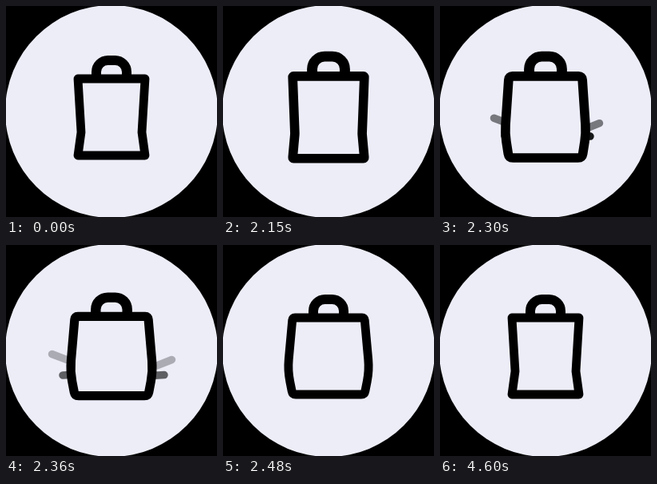
Recreate the animation shown at these times as an HTML page. Size 264 by 264 pixels, loop 4.63 s.

```html
<!DOCTYPE html>
<html lang="en">
<head>
<meta charset="utf-8">
<title>Bag</title>
<style>
  html, body { margin: 0; width: 100%; height: 100%; overflow: hidden; background: #000; }
  svg { display: block; width: 100vw; height: 100vh; }
</style>
</head>
<body>
<svg viewBox="0 0 264 264" fill="none" stroke="#000" stroke-linecap="round" stroke-linejoin="round">
  <circle cx="132" cy="132" r="133" fill="#ecedf7" stroke="none"/>
  <g id="rays" stroke-width="9.5"></g>
  <g id="bag">
    <path d="M113 90V82.5a14.5 14.5 0 0 1 14.5-14.5h9a14.5 14.5 0 0 1 14.5 14.5V90" stroke-width="12"/>
    <path id="body" fill="#ecedf7" stroke-width="10.8"/>
  </g>
</svg>
<script>
const LOOP = 4630, STEP = 30, CENTER = 132;
const OPEN_AT = 2000, OPEN_STEPS = 17, CLOSE_AT = 4480, CLOSE_STEPS = 5;
const $ = id => document.getElementById(id);
const clamp = (v, lo, hi) => Math.min(hi, Math.max(lo, v));
const mix = (a, b, p) => a + (b - a) * p;
const smooth = p => p * p * (3 - 2 * p);
const stepsSince = (t, start, count) => clamp(Math.floor((t - start) / STEP) + 1, 0, count);

// Tip position at step 13, travel per step, fade slope and step of vanishing.
const rays = [
  { x: 57.5, y: 136.5, dx: -5, dy: -1.9, fade: 0.11, end: 15.5 },
  { x: 207.5, y: 143.5, dx: 4, dy: -1.6, fade: 0.11, end: 15.5 },
  { x: 71, y: 163, dx: -5, dy: 0.3, fade: 0.15, end: 17 },
  { x: 198, y: 162.5, dx: 5, dy: -0.3, fade: 0.15, end: 17 }
];
for (const ray of rays) {
  ray.path = document.createElementNS("http://www.w3.org/2000/svg", "path");
  $("rays").append(ray.path);
}

// Closed polygon whose corners [x, y, cut] are rounded off over the length cut.
function roundedPath(corners) {
  const toward = ([x, y, cut], [tx, ty]) => {
    const f = cut / Math.hypot(tx - x, ty - y);
    return `${mix(x, tx, f)} ${mix(y, ty, f)}`;
  };
  const n = corners.length;
  const parts = corners.map((c, i) =>
    `${toward(c, corners[(i + n - 1) % n])}Q${c[0]} ${c[1]} ${toward(c, corners[(i + 1) % n])}`);
  return `M${parts.join("L")}Z`;
}

// The corners draw in a little halfway between the slim and the wide bag.
function bodyPath(p) {
  const inset = p * (1 - p);
  const half = [
    [mix(42, 45, p) - 7 * inset, 91, 3 * p + 10 * inset],
    [mix(38, 51, p), mix(158, 157, p), 14 * p],
    [mix(42, 45, p) - 7 * inset, 187 - 5 * inset, 4 * p + 10 * inset]
  ];
  const side = sign => half.map(([x, y, cut]) => [CENTER + sign * x, y, cut]);
  return roundedPath([...side(1), ...side(-1).reverse()]);
}

function draw(now) {
  const t = now % LOOP;
  const k = stepsSince(t, OPEN_AT, OPEN_STEPS);
  const closing = stepsSince(t, CLOSE_AT, CLOSE_STEPS) / CLOSE_STEPS;
  const spread = smooth(clamp((k - 4) / 11, 0, 1)) * (1 - closing);
  const pulse = k < OPEN_STEPS ? Math.sin(Math.PI * k / OPEN_STEPS) ** 2.5 : 0;

  $("body").setAttribute("d", bodyPath(spread));
  $("bag").setAttribute("transform",
    `translate(${CENTER} ${CENTER}) scale(${1 + 0.1 * pulse}) translate(${-CENTER} ${-CENTER})`);

  for (const { x, y, dx, dy, fade, end, path } of rays) {
    const tipX = x + dx * (k - 13), tipY = y + dy * (k - 13);
    const tail = 20 / Math.hypot(dx, dy);
    path.setAttribute("d", `M${tipX} ${tipY}l${-dx * tail} ${-dy * tail}`);
    path.setAttribute("opacity", k < 11 ? 0 : clamp(fade * (end - k), 0, 1));
  }
}

const start = performance.now();
function tick() {
  draw(performance.now() - start);
  requestAnimationFrame(tick);
}
tick();
</script>
</body>
</html>
```
